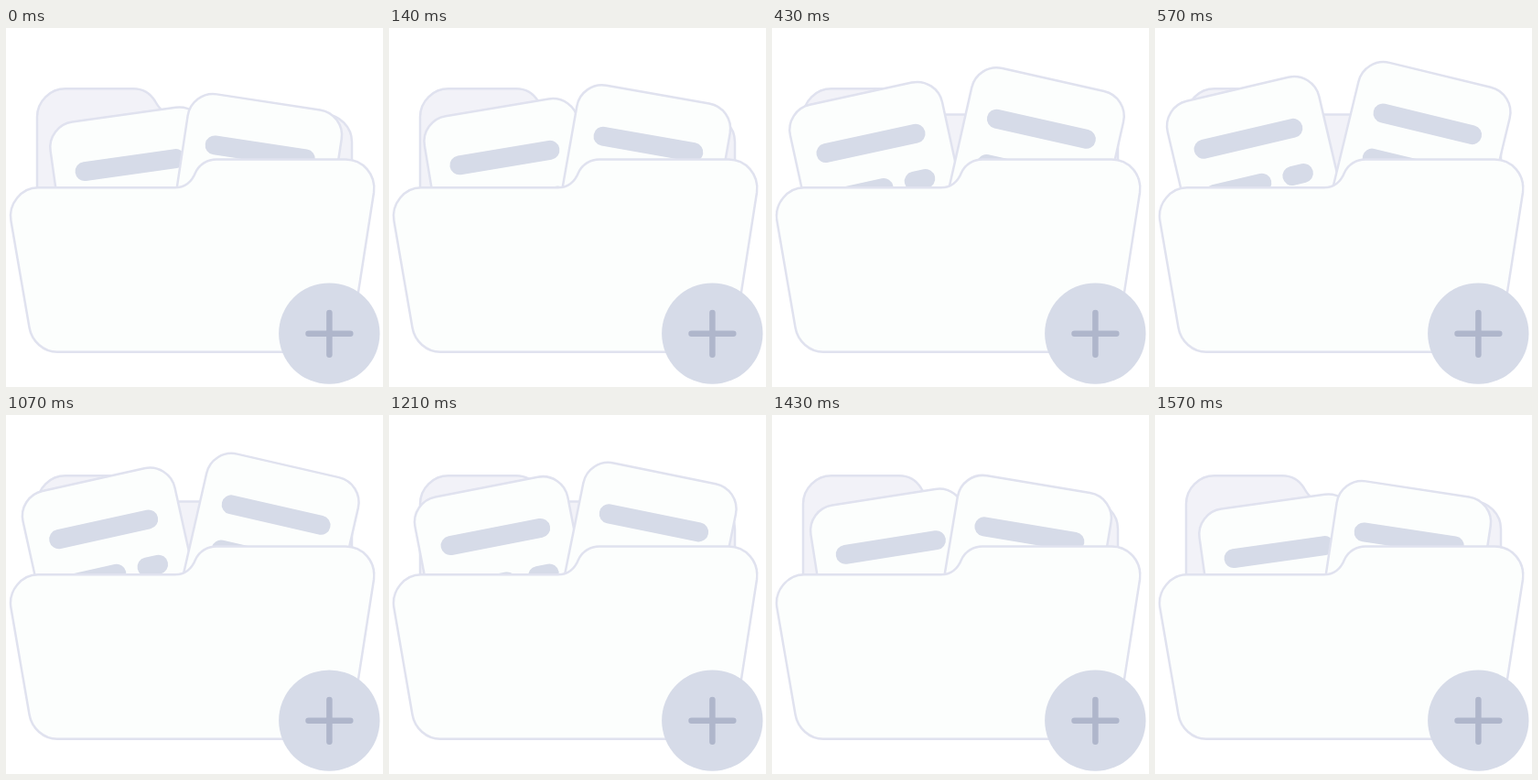
An HTML page that plays this animation: 412x392 px, repeating every 3.07 s.

```html
<!DOCTYPE html>
<html lang="en">
<head>
<meta charset="utf-8">
<title>Folder</title>
<style>
  html, body { margin: 0; width: 100%; height: 100%; overflow: hidden; background: #fff; }
  svg { display: block; width: 100%; height: 100%; }
  .sheet { fill: #fcfefd; stroke: #e0e2ef; stroke-width: 2.5; }
  .back { fill: #f2f2f8; }
  .bar { stroke: #d6dbe8; stroke-width: 21; stroke-linecap: round; }
  .badge { fill: #d6dbe8; }
  .plus { fill: none; stroke: #afb6cb; stroke-width: 6.5; stroke-linecap: round; }
</style>
</head>
<body>
<svg viewBox="0 0 412 392">
  <defs>
    <g id="card">
      <rect class="sheet" width="170" height="190" rx="28"/>
      <path class="bar" d="M34 55.3H134.4M34 105.8H87.6M121.5 105.8H134.4"/>
    </g>
  </defs>
  <path class="sheet back" d="M34 200V97A31 31 0 0 1 65 66.3H139C150 66.3 158 72 163 80C167 87 172 94.5 184 94.5H348A30 30 0 0 1 378 124.5V200Z"/>
  <use id="left" href="#card"/>
  <use id="right" href="#card"/>
  <path class="sheet" d="M35 174.3H185C195 174.3 203 168 207 158C211 149 220 143.5 230 143.5H371C390 143.5 404.5 160 402 179.5L379 327C376 342 364 353.7 349 353.7H56C41 353.7 28 342 25.5 327L5.5 211C2 192 17 174.3 35 174.3Z"/>
  <circle class="badge" cx="353.3" cy="333.6" r="55.2"/>
  <path class="plus" d="M330.5 333.8H376.3M353.4 311V356.8"/>
</svg>
<script>
  const LOOP = 3070, CLOSE_AT = 1000;
  const STEPS = [70, 140, 210, 290, 360, 430, 500, 570];

  // Each pose: x, y of the top left corner, angle
  const cards = [
    { el: document.getElementById('left'), shut: [44.7, 106.5, -8], open: [7.4, 86.2, -13.2] },
    { el: document.getElementById('right'), shut: [202.8, 68.2, 8.6], open: [229, 31.3, 13.6] }
  ];

  const cubic = (a, b, s) => 3 * a * s * (1 - s) ** 2 + 3 * b * s * s * (1 - s) + s ** 3;

  // cubic-bezier(.167, .167, .833, 1), solved by bisection
  function ease(x) {
    if (x <= 0 || x >= 1) return x;
    let lo = 0, hi = 1;
    for (let i = 0; i < 24; i++) {
      const mid = (lo + hi) / 2;
      if (cubic(.167, .833, mid) < x) lo = mid; else hi = mid;
    }
    return cubic(.167, 1, lo);
  }

  // Eased progress, held between steps
  const progress = t => ease(STEPS.filter(s => s <= t).length / STEPS.length);

  function draw(t) {
    const p = t < CLOSE_AT ? progress(t) : 1 - progress(t - CLOSE_AT);
    for (const { el, shut, open } of cards) {
      const [x, y, angle] = shut.map((v, i) => v + (open[i] - v) * p);
      el.setAttribute('transform', `translate(${x} ${y}) rotate(${angle})`);
    }
  }

  const start = performance.now();
  function tick() {
    draw((performance.now() - start) % LOOP);
    requestAnimationFrame(tick);
  }
  tick();
</script>
</body>
</html>
```
